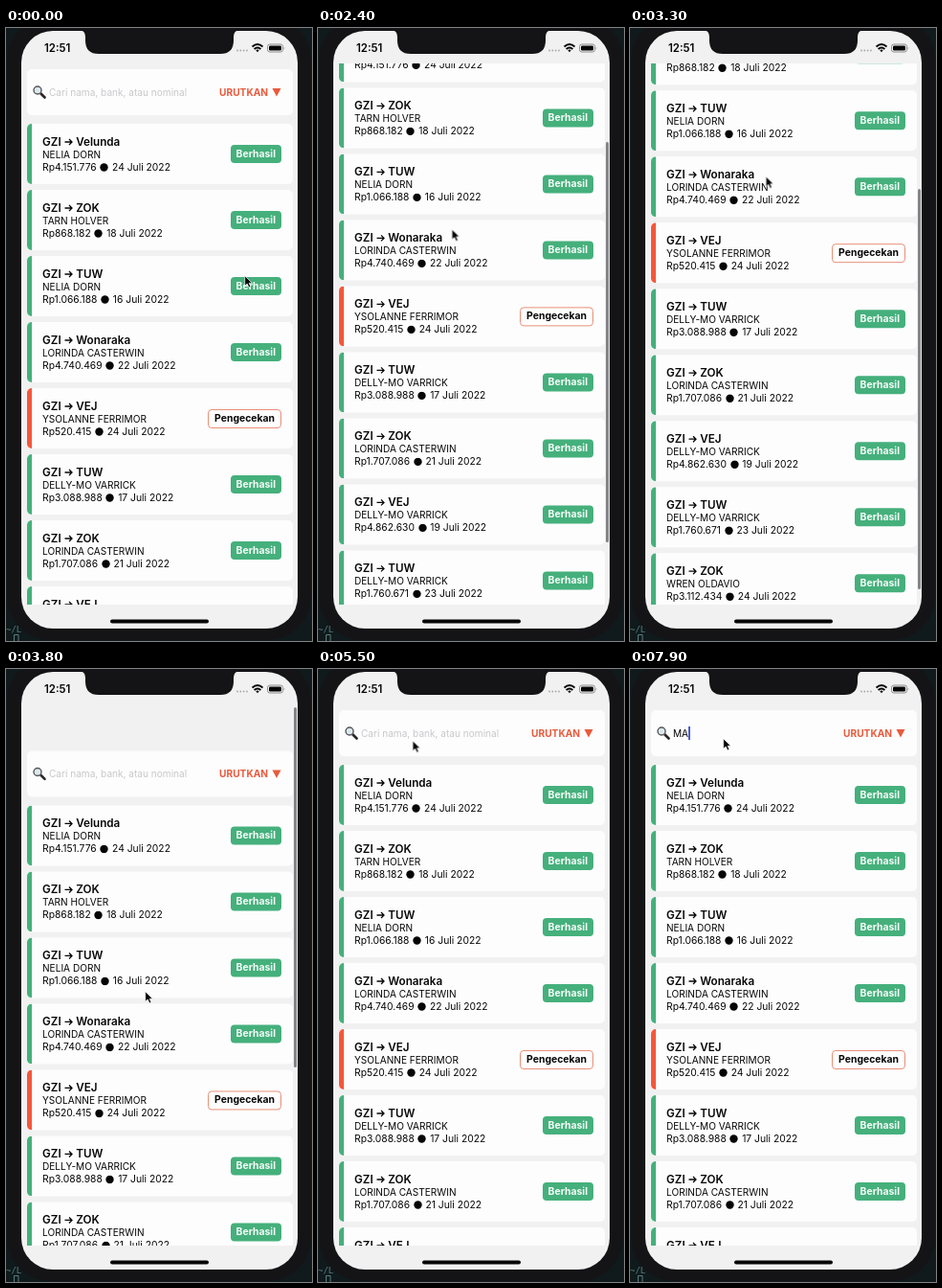
An HTML page that plays this animation: 320x640 px, repeating every 8 s.

```html
<!DOCTYPE html>
<html lang="id">
<head>
<meta charset="utf-8">
<title>Daftar transaksi</title>
<style>
  :root { --ink: #060607; --bezel: #141416; --page: #f1f1f1; --accent: #ea5a3c; }
  html, body { margin: 0; width: 100%; height: 100%; overflow: hidden; background: #10191c; }
  body { font: 10.1px Inter, "Liberation Sans", sans-serif; color: var(--ink); }
  #stage { position: relative; width: 320px; height: 640px; overflow: hidden; }
  #stage, #stage * { box-sizing: border-box; }
  .abs, #stage > *, .card, .badge { position: absolute; }

  .body { left: 1px; top: -12px; width: 318px; height: 651px; border-radius: 46px; background: var(--bezel); }
  .screen { left: 16px; top: 3px; width: 289px; height: 624px; border-radius: 33px; background: var(--page); }
  .chrome { left: 0; top: 0; }
  .clock { left: 40px; top: 14px; line-height: 14px; font-size: 11.4px; font-weight: 600; }
  .prompt { left: 0; top: 622px; font: 9px/12px "DejaVu Sans Mono", monospace; color: #55807c; }

  .view { left: 16px; top: 37px; width: 289px; height: 565px; overflow: hidden; }
  .list { position: absolute; inset: 0; animation: scroll 8s infinite; }
  .card { left: 6px; width: 278px; height: 63px; border-radius: 5px; background: #fdfdfe; white-space: nowrap; }
  .search { top: 6px; height: 48px; }
  .row { padding: 12px 0 0 11px; border-left: 5px solid var(--tone); line-height: 13px; }
  .row b { display: block; font-size: 11.7px; line-height: 14px; font-weight: 600; }
  .row b svg { margin: 0 3.3px; }
  .sum { font-size: 10.3px; }
  .sum svg { margin: 0 3.7px; vertical-align: -1px; }
  .done { --tone: #45b07c; }
  .wait { --tone: #f4573a; }
  .badge { right: 12px; top: 22px; height: 19px; padding: 0 6px; border-radius: 4px;
           font-size: 10.4px; line-height: 19px; font-weight: 700; background: var(--tone); color: #f6fcf8; }
  .wait .badge { height: 20px; line-height: 18px; background: #fefefe; color: var(--ink); border: 1px solid #e98f78; }

  .sort { left: 201px; top: 17px; line-height: 14px; font-size: 10.2px; font-weight: 700; color: var(--accent); }
  .field { left: 23px; top: 17px; line-height: 14px; }
  .hint { color: #c8c8ca; animation: hint 8s step-end infinite; }
  .one { animation: one 8s step-end infinite; }
  .two { animation: two 8s step-end infinite; }
  .caret { display: inline-block; width: 1.5px; height: 14px; background: #4c5fd2; vertical-align: top; }
  .blink { left: 23px; top: 17px; animation: blink 8s linear infinite; }

  .bar { left: 301px; top: 40px; width: 2.5px; height: 418px; border-radius: 2px; background: #858588;
         animation: bar 8s infinite, show 8s linear infinite; }
  .cursor { left: 0; top: 0; animation: point 8s ease-in-out infinite; }

  /* Two flicks: past the end of the list, then back past its top. */
  @keyframes scroll {
    0%, 26.5% { transform: translateY(0); animation-timing-function: ease-in; }
    31.5% { transform: translateY(-191px); animation-timing-function: ease-out; }
    33.5% { transform: translateY(-205px); animation-timing-function: linear; }
    35% { transform: translateY(-199px); animation-timing-function: ease-out; }
    38%, 40% { transform: translateY(-191px); animation-timing-function: ease-in; }
    45% { transform: translateY(0); animation-timing-function: ease-out; }
    47.5% { transform: translateY(42.5px); animation-timing-function: cubic-bezier(.3, .2, .4, 1); }
    55% { transform: translateY(1px); animation-timing-function: linear; }
    57%, 100% { transform: translateY(0); }
  }
  @keyframes bar {
    0%, 26.5% { top: 40px; height: 418px; animation-timing-function: ease-in; }
    31.5% { top: 181px; height: 418px; animation-timing-function: ease-out; }
    33.5% { top: 195px; height: 404px; animation-timing-function: linear; }
    35% { top: 189px; height: 410px; animation-timing-function: ease-out; }
    38%, 40% { top: 181px; height: 418px; animation-timing-function: ease-in; }
    45% { top: 40px; height: 418px; animation-timing-function: ease-out; }
    47.5% { top: 40px; height: 375.5px; animation-timing-function: cubic-bezier(.3, .2, .4, 1); }
    55% { top: 40px; height: 417px; animation-timing-function: linear; }
    57%, 100% { top: 40px; height: 418px; }
  }
  @keyframes show {
    0%, 26.5% { opacity: 0; }
    27.5%, 59% { opacity: 1; }
    63%, 100% { opacity: 0; }
  }
  @keyframes point {
    0%, 5% { transform: translate(249px, 258px); }
    19%, 26% { transform: translate(137px, 347px); }
    33%, 39.5% { transform: translate(141px, 127px); }
    46.5%, 48.5% { transform: translate(145px, 336px); }
    54.5%, 60% { transform: translate(144px, 147px); }
    70%, 100% { transform: translate(97px, 72px); }
  }
  @keyframes hint { 0% { opacity: 1; } 93.75%, 100% { opacity: 0; } }
  @keyframes one { 0% { opacity: 0; } 93.75% { opacity: 1; } 96.25%, 100% { opacity: 0; } }
  @keyframes two { 0% { opacity: 0; } 96.25%, 100% { opacity: 1; } }
  @keyframes blink {
    0%, 77.5% { opacity: 0; }
    78.75%, 81.25% { opacity: 1; }
    83.75% { opacity: .4; }
    86.25%, 93.7% { opacity: 1; }
    93.75%, 100% { opacity: 0; }
  }
</style>
</head>
<body>
<div id="stage">
  <div class="body"></div>
  <div class="prompt">~/L</div>
  <div class="screen"></div>

  <div class="view">
    <div class="list" id="list">
      <div class="card search">
        <svg class="abs" style="left:5px;top:16px" width="16" height="16">
          <path d="M9.5 9.5L13.5 13.5" stroke="#2b2624" stroke-width="2.6" stroke-linecap="round"/>
          <circle cx="6" cy="6" r="4" fill="#dbe8ec" stroke="#55565a" stroke-width="1.4"/>
        </svg>
        <span class="abs field hint">Cari nama, bank, atau nominal</span>
        <span class="abs blink"><span class="caret"></span></span>
        <span class="abs field one">M<span class="caret"></span></span>
        <span class="abs field two">MA<span class="caret"></span></span>
        <span class="abs sort">URUTKAN</span>
        <svg class="abs" style="left:256px;top:19px" width="10" height="10">
          <path d="M.5 1H9.5L5 9.5Z" fill="var(--accent)"/>
        </svg>
      </div>
    </div>
  </div>
  <div class="bar"></div>

  <svg class="chrome" width="320" height="640">
    <path d="M77 2Q83 3 83 9V13Q83 27 97 27H224Q238 27 238 13V9Q238 3 244 2Z" fill="var(--bezel)"/>
    <g fill="#a8a8aa">
      <circle cx="242" cy="23.5" r=".9"/><circle cx="245.3" cy="23.5" r=".9"/>
      <circle cx="248.6" cy="23.5" r=".9"/><circle cx="251.9" cy="23.5" r=".9"/>
    </g>
    <g fill="none" stroke="var(--ink)" stroke-width="1.9">
      <path d="M257.5 19.5Q263 14.5 268.5 19.5M259.6 22Q263 18.8 266.4 22"/>
      <path d="M261.3 23.3Q263 21.9 264.7 23.3L263 25.3Z" fill="var(--ink)" stroke="none"/>
    </g>
    <rect x="273.5" y="17" width="16" height="8" rx="2.3" fill="none" stroke="#8c8c8e"/>
    <rect x="275" y="18.5" width="13" height="5" rx="1.2" fill="var(--ink)"/>
    <path d="M290.7 19.5Q292.3 21 290.7 22.5Z" fill="#8c8c8e"/>
    <rect x="109" y="617.5" width="103" height="4" rx="2" fill="var(--ink)"/>
    <path d="M8.5 640V633.5H13V640" fill="none" stroke="#55807c"/>
  </svg>
  <div class="clock">12:51</div>

  <svg class="cursor" width="12" height="16">
    <path d="M.7 .7V11.2L3.2 9L5 13L6.9 12.1L5.2 8.3H8.4Z" fill="var(--ink)" stroke="#fff" stroke-width=".7"/>
  </svg>
</div>

<script>
  const rows = [
    ["Velunda", "NELIA DORN", "4.151.776", 24],
    ["ZOK", "TARN HOLVER", "868.182", 18],
    ["TUW", "NELIA DORN", "1.066.188", 16],
    ["Wonaraka", "LORINDA CASTERWIN", "4.740.469", 22],
    ["VEJ", "YSOLANNE FERRIMOR", "520.415", 24, true],
    ["TUW", "DELLY-MO VARRICK", "3.088.988", 17],
    ["ZOK", "LORINDA CASTERWIN", "1.707.086", 21],
    ["VEJ", "DELLY-MO VARRICK", "4.862.630", 19],
    ["TUW", "DELLY-MO VARRICK", "1.760.671", 23],
    ["ZOK", "WREN OLDAVIO", "3.112.434", 24]
  ];
  const arrow = `<svg width="9" height="8"><path d="M.5 4H8M5 1L8 4L5 7"
    fill="none" stroke="var(--ink)" stroke-width="1.3"/></svg>`;
  const dot = `<svg width="9" height="9"><circle cx="4.5" cy="4.5" r="4.2" fill="var(--ink)"/></svg>`;

  const card = ([bank, name, sum, day, pending], i) => `
    <div class="card row ${pending ? "wait" : "done"}" style="top:${63 + 69 * i}px">
      <b>GZI${arrow}${bank}</b>
      <div>${name}</div>
      <div class="sum">Rp${sum}${dot}${day} Juli 2022</div>
      <span class="badge">${pending ? "Pengecekan" : "Berhasil"}</span>
    </div>`;

  document.getElementById("list").insertAdjacentHTML("beforeend", rows.map(card).join(""));
</script>
</body>
</html>
```
